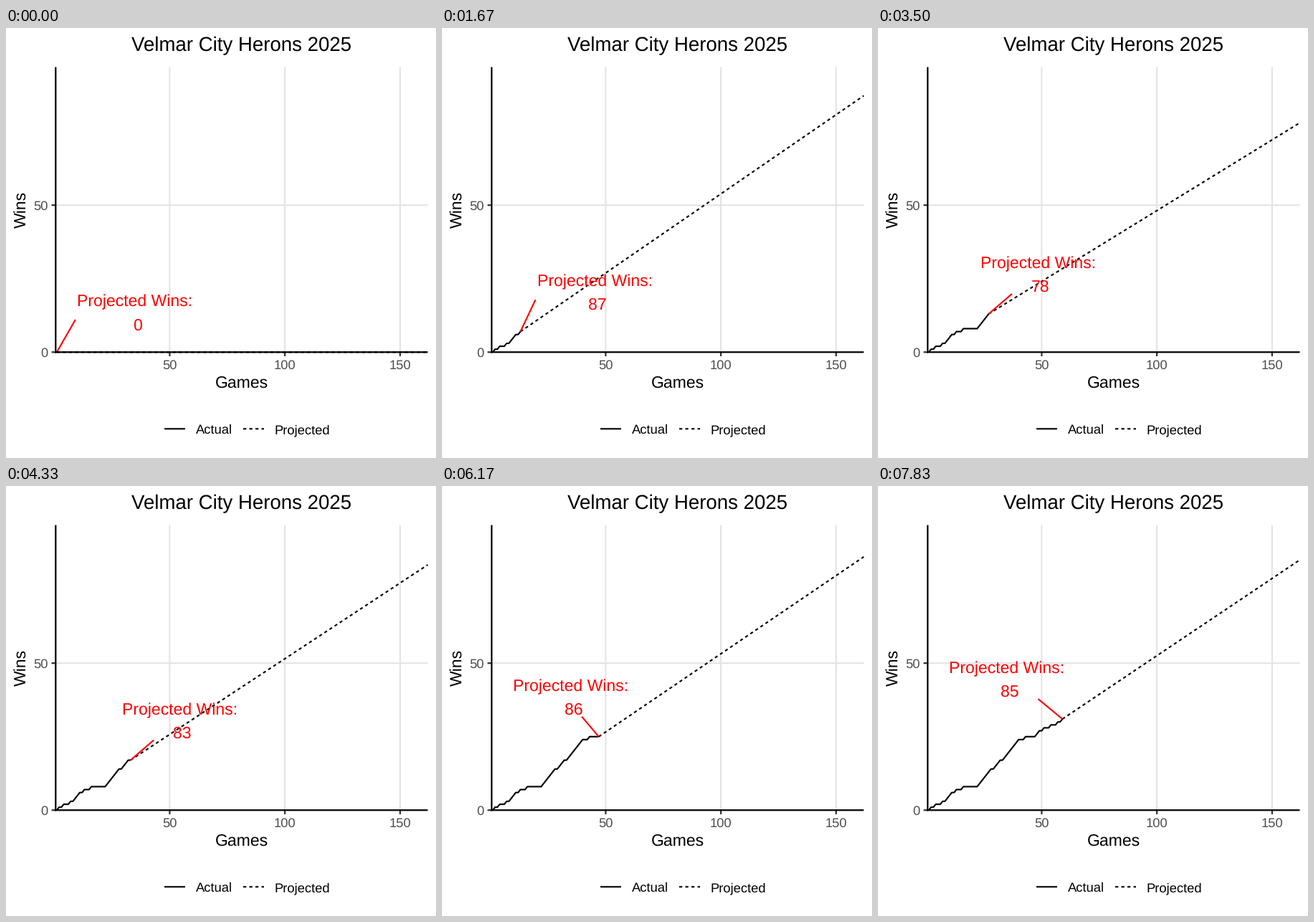
Animation of 600x600 px, one loop 8000 ms. Source, as a matplotlib script:

```python
import math

import matplotlib.pyplot as plt
import numpy as np
from matplotlib.animation import FuncAnimation

plt.rcParams["font.family"] = "Liberation Sans"
plt.rcParams["text.hinting"] = "no_hinting"

DPI = 100
PX = 72 / DPI                       # points per pixel
SEASON = 162
STEPS, TICKS, LOOP_MS = 48, 5, 8000  # each step is held for several ticks

RESULTS = ("LWLWLLWLWWWLWLLW" + "L" * 6 + "W" * 6 + "LWWWL" + "W" * 7
           + "LLWLLLLWWLWLLWLLWLW")
wins = np.cumsum([r == "W" for r in RESULTS])
games = np.arange(1, len(RESULTS) + 1)

LEFT, RIGHT, TOP, BASE = 69.3, 588.5, 54.5, 452.3
HALF_W, HALF_H = 83, 28             # half size of the label box
LABEL_MIN_X = 180


def sx(game):
    return 228.4 + (game - 50) * 3.215


def sy(win):
    return BASE - win * 4.102


fig = plt.figure(figsize=(6, 6), dpi=DPI, facecolor="white")
ax = fig.add_axes([0, 0, 1, 1])
ax.set_xlim(0, 600)
ax.set_ylim(600, 0)
ax.axis("off")


def line(xs, ys, color="black", width=2.13, z=2, **kw):
    return ax.plot(xs, ys, color=color, lw=width * PX, zorder=z, snap=False,
                   solid_capstyle="butt", dash_capstyle="butt", **kw)[0]


def text(x, y, s, size, color="black", ha="center", **kw):
    return ax.text(x, y, s, fontsize=size * PX, color=color, ha=ha,
                   va="baseline", zorder=4, **kw)


# Grid, axes and ticks
line([LEFT, RIGHT], [sy(50)] * 2, "#e5e5e5", 2.23, 1)
for g in (50, 100, 150):
    line([sx(g)] * 2, [TOP, BASE], "#e5e5e5", 2.23, 1)
    line([sx(g)] * 2, [BASE, BASE + 5.75], "#333333", 2.23, 4)
    text(sx(g), 476.3, str(g), 18.4, "#4d4d4d")
for w in (0, 50):
    line([LEFT - 5.75, LEFT], [sy(w)] * 2, "#333333", 2.23, 4)
    text(58.8, sy(w) + 6.5, str(w), 18.4, "#4d4d4d", "right")
line([LEFT, LEFT], [TOP, BASE + 1.1], width=2.23, z=5)
line([LEFT - 1.1, RIGHT], [BASE, BASE], width=2.23, z=5)

# Titles and legend
text(329, 32.4, "Velmar City Herons 2025", 27.6)
text(329, 502, "Games", 23)
text(27.5, 253.5, "Wins", 23, rotation=90, rotation_mode="anchor")
DASH = (0, (2, 2))
line([221, 250], [559.3] * 2)
line([331, 360], [559.3] * 2, ls=DASH)
text(264.5, 566, "Actual", 18.4, ha="left")
text(374.4, 566, "Projected", 18.4, ha="left")

actual = line([], [])
projected = line([], [], ls=DASH)
pointer = line([], [], "red", z=3)
caption = text(0, 0, "Projected Wins:", 23, "red")
value = text(0, 0, "", 23, "red")


def label_center(game, px):
    """The label leads the early points, then rests at its left limit."""
    if game >= 34:
        return LABEL_MIN_X
    return px + np.interp(game, [1, 13, 22], [109, 104, 69])


def pointer_end(px, py, cx):
    """Where the pointer meets the edge of the label box."""
    gap = cx - HALF_W - px
    bottom = py - HALF_H
    if gap > 0:
        pull = math.hypot(gap, HALF_H) / math.hypot(gap, 2 * HALF_H)
        return cx - HALF_W, bottom - HALF_H * pull
    shift = np.interp(abs(cx - px), [0, 24, 55, 78], [0, 18, 30, 34])
    return px + math.copysign(shift, cx - px), bottom


def update(tick):
    step = min((tick + 1) // TICKS, STEPS - 1)
    game = round(1 + step * (len(RESULTS) - 1) / (STEPS - 1))
    won = wins[game - 1]
    total = SEASON * won / game
    px, py = sx(game), sy(won)
    cx = label_center(game, px)
    ex, ey = pointer_end(px, py, cx)

    actual.set_data(sx(games[:game]), sy(wins[:game]))
    projected.set_data([px, sx(SEASON)], [py, sy(total)])
    pointer.set_data([px, ex], [py, ey])
    caption.set_position((cx, py - 63.8))
    value.set_position((cx + 3.4, py - 31))
    value.set_text(str(round(total)))
    return actual, projected, pointer, caption, value


anim = FuncAnimation(fig, update, frames=STEPS * TICKS,
                     interval=LOOP_MS / (STEPS * TICKS),
                     repeat=True, repeat_delay=0, blit=False)
plt.show()
```
